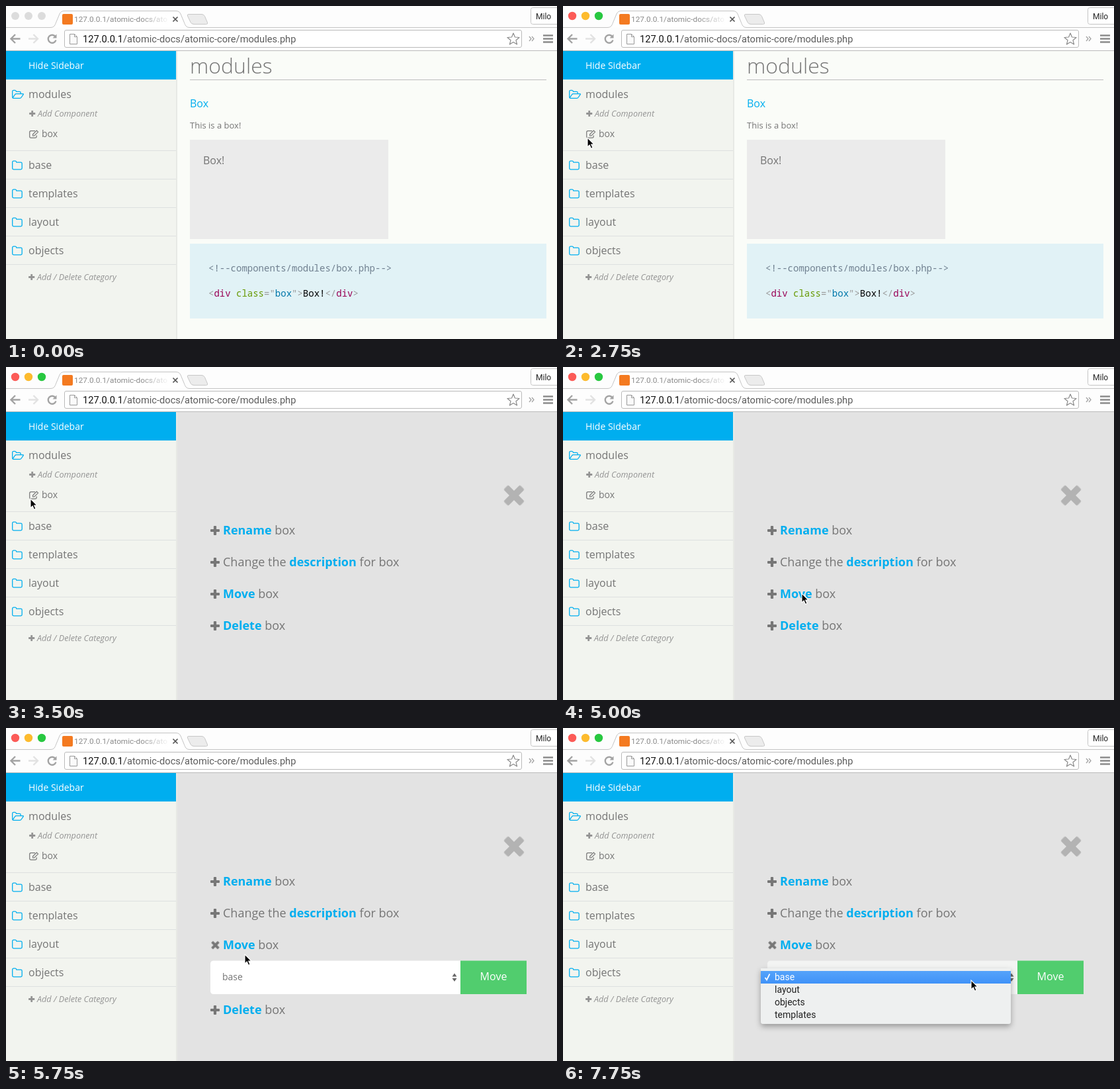
Write an HTML page that moves like this. It is 833 by 503 pixels and loops after 8 s.

```html
<!DOCTYPE html>
<html lang="en">
<head>
<meta charset="utf-8">
<title>Moving a component</title>
<style>
html, body { margin: 0; width: 100%; height: 100%; overflow: hidden; background: #fafcf8; }
svg { display: block; width: 833px; height: 503px; }
text { font-family: "Open Sans", sans-serif; font-size: 16px; fill: #757575; white-space: pre; }
.ui { font-family: Roboto, sans-serif; }
.small { font-size: 14px; }
.add { font-size: 12.7px; font-style: italic; fill: #949494; }
.code { font-family: "Noto Sans Mono", monospace; font-size: 14px; }
.menu text { font-size: 18px; }
.menu tspan { font-weight: 700; fill: #00aeef; }
.drop text { font-size: 14px; fill: #222; }
.icon { fill: none; stroke: #00aeef; stroke-width: 1.3; stroke-linejoin: round; }
.tool { fill: none; stroke: #a3a3a3; stroke-width: 2.4; }

/* every change is a hard cut: 1% = 80 ms */
.a { animation: 8s step-end infinite; }
.lights { animation-name: lights; }
.cursor { animation-name: cursor; }
.panel { animation-name: panel; }
.top { animation-name: rise; }
.below { animation-name: sink; }
.closed { animation-name: closed; }
.opened { animation-name: opened; }
.drop { animation-name: drop; }
.field { animation-name: field; }
@keyframes lights { 0% { opacity: 0 } 34.375%, 100% { opacity: 1 } }
@keyframes panel {
  0% { transform: translateX(574px) }
  40.625% { transform: translateX(241px) }
  43.75%, 100% { transform: none }
}
@keyframes rise {
  0% { transform: none }
  68.75% { transform: translateY(-11px) }
  71.875%, 100% { transform: translateY(-15px) }
}
@keyframes sink {
  0% { transform: none }
  68.75% { transform: translateY(26px) }
  71.875%, 100% { transform: translateY(35px) }
}
@keyframes closed { 0% { opacity: 1 } 68.75%, 100% { opacity: 0 } }
@keyframes opened { 0% { opacity: 0 } 68.75%, 100% { opacity: 1 } }
@keyframes drop { 0% { opacity: 0 } 90.625%, 100% { opacity: 1 } }
@keyframes field { 0% { fill: #fff } 90.625%, 100% { fill: #f3f4f3 } }
@keyframes cursor {
  0% { transform: translate(-30px, 0) }
  12.5% { transform: translate(348px, 32px) }
  15.625% { transform: translate(315px, 46px) }
  18.75% { transform: translate(142px, 148px) }
  21.875% { transform: translate(78px, 187px) }
  25% { transform: translate(38px, 198px) }
  28.125% { transform: translate(36px, 198px) }
  50% { transform: translate(212px, 206px) }
  53.125% { transform: translate(366px, 267px) }
  56.25% { transform: translate(367px, 324px) }
  59.375% { transform: translate(359px, 339px) }
  62.5% { transform: translate(360px, 341px) }
  78.125% { transform: translate(568px, 322px) }
  81.25% { transform: translate(637px, 354px) }
  84.375% { transform: translate(662px, 375px) }
  87.5% { transform: translate(663px, 376px) }
  96.875%, 100% { transform: translate(616px, 380px) }
}
</style>
</head>
<body>
<svg viewBox="0 0 833 503">
  <defs>
    <linearGradient id="fade"><stop offset="0" stop-color="#fff" stop-opacity="0"/><stop offset="1" stop-color="#fff"/></linearGradient>
    <linearGradient id="blue" x2="0" y2="1"><stop offset="0" stop-color="#55a3fa"/><stop offset="1" stop-color="#3f92f8"/></linearGradient>
    <filter id="shadow" x="-10%" y="-20%" width="120%" height="150%"><feDropShadow dx="0" dy="4" stdDeviation="4" flood-opacity=".32"/></filter>
    <path id="folder" d="M9.7 2.4Q9.7.7 11.4.7H14.2Q15.7.7 15.8 2.7H22.4Q24.2 2.7 24.2 4.5V11.5Q24.2 13.3 22.4 13.3H11.4Q9.7 13.3 9.7 11.5Z"/>
    <g id="plus"><rect x="-7" y="-2.1" width="14" height="4.2" rx="1"/><rect x="-2.1" y="-7" width="4.2" height="14" rx="1"/></g>
    <g id="cross" transform="rotate(45)"><rect x="-17.5" y="-5" width="35" height="10" rx="2"/><rect x="-5" y="-17.5" width="10" height="35" rx="2"/></g>
  </defs>

  <!-- page -->
  <rect width="833" height="503" fill="#fafcf8"/>
  <text x="278" y="102" style="font-size:32px;font-weight:300">modules</text>
  <path d="M278 111.5H817" stroke="#bdbdbd"/>
  <text x="278" y="153" style="fill:#00aeef">Box</text>
  <text x="278" y="185" style="font-size:13px">This is a box!</text>
  <rect x="278" y="202" width="300" height="150" fill="#ebebeb"/>
  <text x="298" y="239">Box!</text>
  <rect x="278" y="359" width="539" height="113" fill="#e1f2f6"/>
  <text class="code" x="306" y="401" style="fill:#708090">&lt;!--components/modules/box.php--&gt;</text>
  <text class="code" x="306" y="439"><tspan fill="#999">&lt;</tspan><tspan fill="#905">div</tspan> <tspan fill="#690">class</tspan><tspan fill="#999">="</tspan><tspan fill="#07a">box</tspan><tspan fill="#999">"&gt;</tspan><tspan fill="#000">Box!</tspan><tspan fill="#999">&lt;/</tspan><tspan fill="#905">div</tspan><tspan fill="#999">&gt;</tspan></text>

  <!-- sliding panel -->
  <g class="a panel">
    <rect x="259" y="68" width="574" height="435" fill="#e3e3e3"/>
    <g class="a top menu">
      <use href="#cross" x="0" y="0" transform="translate(768 194)" fill="#b3b3b3"/>
      <g fill="#777">
        <use href="#plus" x="316" y="247"/>
        <use href="#plus" x="316" y="295"/>
        <use class="a closed" href="#plus" x="316" y="343"/>
        <g class="a opened"><use href="#cross" transform="translate(316.5 343) scale(.4)"/></g>
      </g>
      <text x="328" y="253"><tspan>Rename</tspan> box</text>
      <text x="328" y="301">Change the <tspan>description</tspan> for box</text>
      <text x="328" y="349"><tspan>Move</tspan> box</text>
      <g class="a opened">
        <path class="a field" d="M687 366.5H314Q309 366.5 309 371.5V412Q309 417 314 417H687Z" fill="#fff"/>
        <rect x="687" y="366.5" width="100" height="50.5" fill="#51cd6e"/>
        <text x="327" y="396" style="font-size:14px">base</text>
        <path d="M674.5 390.5L678 385.5L681.500 390.5ZM674.5 393L678 398L681.5 393Z" fill="#666"/>
        <text x="737" y="396" text-anchor="middle" style="font-size:16px;fill:#fff">Move</text>
      </g>
    </g>
    <g class="a below menu">
      <rect x="300" y="367" width="500" height="136" fill="#e3e3e3"/>
      <use href="#plus" x="316" y="391" fill="#777"/>
      <text x="328" y="397"><tspan>Delete</tspan> box</text>
    </g>
  </g>

  <!-- sidebar -->
  <rect y="68" width="258" height="435" fill="#f2f4ef"/>
  <path d="M258 68V503" stroke="#e2e4e0" stroke-width="1.5"/>
  <rect y="68" width="257" height="43" fill="#00aeef"/>
  <text class="small" x="34" y="95" style="fill:#fff">Hide Sidebar</text>
  <path d="M0 218.500H257M0 261.500H257M0 304.500H257M0 347.500H257M0 390.500H257" stroke="#dde0e0"/>
  <g class="icon">
    <path d="M9.700 137.500V129Q9.700 127.300 11.400 127.300H13.700Q15.300 127.300 15.400 129.300H20.500Q22.200 129.300 22.200 131V132.500M10 138.900L13.700 133.500Q14.400 132.600 15.500 132.600H25.500Q26.900 132.600 26 133.900L23.200 138Q22.300 139.300 20.900 139.300H11Q9.700 139.300 9.700 137.500"/>
    <use href="#folder" y="233.500"/>
    <use href="#folder" y="276.500"/>
    <use href="#folder" y="319.500"/>
    <use href="#folder" y="362.500"/>
  </g>
  <text x="34" y="139">modules</text>
  <text x="34" y="246">base</text>
  <text x="34" y="289">templates</text>
  <text x="34" y="332">layout</text>
  <text x="34" y="375">objects</text>
  <g fill="#949494">
    <use href="#plus" transform="translate(39.700 162.500) scale(.66)"/>
    <use href="#plus" transform="translate(38.700 409.500) scale(.66)"/>
  </g>
  <text class="add" x="48" y="167">Add Component</text>
  <text class="add" x="47" y="414">Add / Delete Category</text>
  <g fill="none" stroke="#777" stroke-width="1.200">
    <path d="M44 188.600H37.800Q35.700 188.600 35.700 190.700V197Q35.700 199.200 37.800 199.200H44Q46.200 199.200 46.200 197V195.500"/>
    <path d="M40.600 196V193.800L46.300 188.100L48.500 190.300L42.800 196Z"/>
  </g>
  <text class="small" x="54" y="198">box</text>

  <!-- browser window -->
  <rect width="833" height="68" fill="#fdfdfd"/>
  <path d="M0 67.500H833" stroke="#bbb"/>
  <path d="M0 32.500H67C73 32.500 74 29 76 24L81 12Q83 7.500 88 7.500H257Q262 7.500 264 12L269 24C271 29 272 32.500 278 32.500H833" fill="#fff" stroke="#c4c4c4"/>
  <path d="M276 12.500H296Q299 12.500 300.500 15.500L304.500 25Q305.500 27.500 302.500 27.500H284Q280.500 27.500 279 24.500L274.500 15Q273.500 12.500 276 12.500Z" fill="#ececec" stroke="#c8c8c8"/>
  <g fill="#dcdcdc"><circle cx="14" cy="15" r="6"/><circle cx="34" cy="15" r="6"/><circle cx="54" cy="15" r="6"/></g>
  <g class="a lights">
    <circle cx="14" cy="15" r="6.200" fill="#fc5b57"/><circle cx="34" cy="15" r="6.200" fill="#fdbb2d"/><circle cx="54" cy="15" r="6.200" fill="#28c840"/>
  </g>
  <rect x="85" y="12" width="16" height="16" rx="2" fill="#f47a20"/>
  <text class="ui" x="103" y="24" style="font-size:11.800px;fill:#8a8a8a">127.0.0.1/atomic-docs/ato</text>
  <rect x="205" y="11" width="42" height="18" fill="url(#fade)"/>
  <path d="M252.500 16.500L259.500 23.500M259.500 16.500L252.500 23.500" stroke="#555" stroke-width="1.700"/>
  <rect x="793.500" y="2.500" width="45" height="25" rx="3" fill="#fff" stroke="#c4c4c4"/>
  <text class="ui" x="801" y="20" style="font-size:12px;fill:#222">Milo</text>

  <g class="tool">
    <path d="M21.500 49.500H8M14 43L7.500 49.500L14 56"/>
    <path d="M34 49.500H47.500M41.500 43L48 49.500L41.500 56" stroke="#e2e2e2"/>
    <path d="M74.500 46A6 6 0 1 0 75.500 51.500"/>
    <path d="M76.500 42.500V48.500H70.500Z" fill="#a3a3a3" stroke="none"/>
    <path d="M812 44.500H827M812 49.500H827M812 54.500H827" stroke="#8c8c8c"/>
    <path d="M791 46L794 49.500L791 53M795 46L798 49.500L795 53" stroke-width="1.300"/>
  </g>
  <rect x="88.500" y="36.500" width="691" height="26" rx="2.500" fill="#fff" stroke="#bababa"/>
  <path d="M96.500 42.500H103.500L107.500 46.500V57.500H96.500ZM103.500 42.500V46.500H107.500" fill="#fafafa" stroke="#999"/>
  <text class="ui" x="116" y="55" style="font-size:14.650px;fill:#5c5c5c"><tspan fill="#111">127.0.0.1</tspan>/atomic-docs/atomic-core/modules.php</text>
  <path d="M767 41L769.500 47L776 47.500L771 51.800L772.600 58L767 54.600L761.400 58L763 51.800L758 47.500L764.500 47Z" fill="none" stroke="#8a8a8a" stroke-width="1.200" stroke-linejoin="round"/>

  <!-- open select -->
  <g class="a drop">
    <path d="M299 363H677V443Q677 447 673 447H303Q299 447 299 443Z" fill="#eef0f0" filter="url(#shadow)"/>
    <rect x="299" y="367" width="378" height="19" fill="url(#blue)"/>
    <path d="M305.500 377L308 380.500L312.500 371.500" fill="none" stroke="#fff" stroke-width="1.700"/>
    <text class="ui" x="320" y="381" style="fill:#fff">base</text>
    <text class="ui" x="320" y="400">layout</text>
    <text class="ui" x="320" y="419">objects</text>
    <text class="ui" x="320" y="438">templates</text>
  </g>

  <path class="a cursor" d="M1 1V14.800L4.200 11.900L6.500 17.300L9 16.200L6.700 11H11Z" fill="#000" stroke="#fff" stroke-width="1.100"/>
</svg>
</body>
</html>
```
